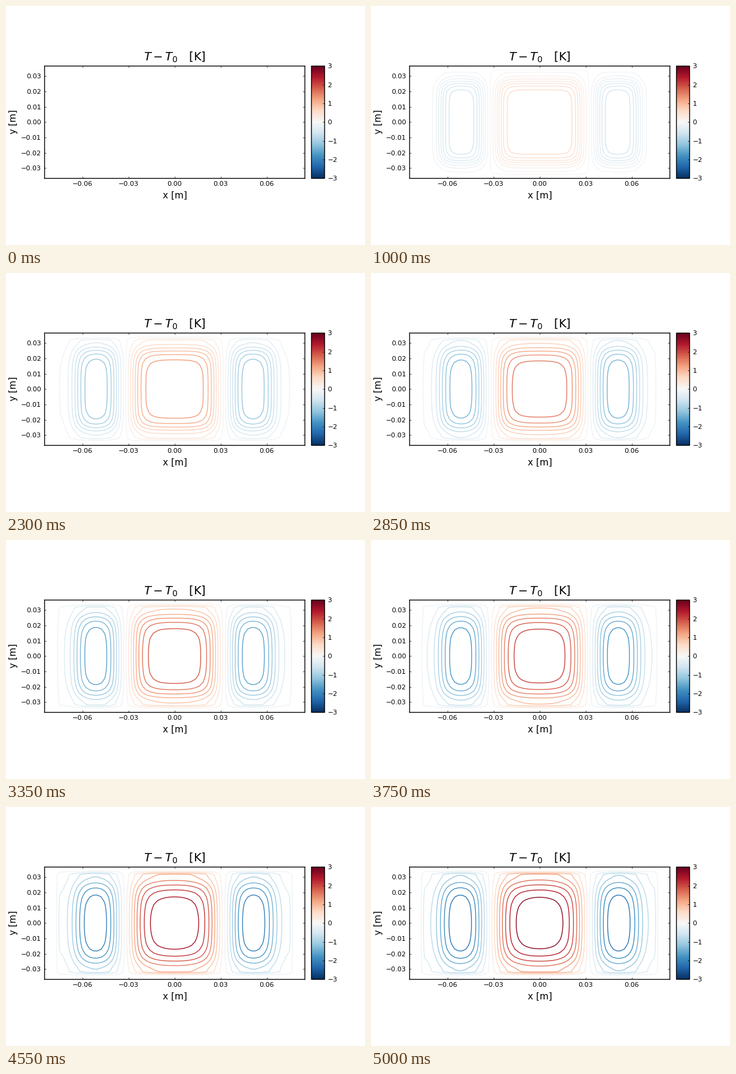
A matplotlib script that plays this animation: 600x400 px, repeating every 5050 ms.

```python
import numpy as np
import matplotlib.pyplot as plt
from matplotlib.animation import FuncAnimation
from matplotlib.cm import ScalarMappable
from matplotlib.colors import Normalize

W, H, DPI = 600, 400, 100
FRAMES, INTERVAL = 101, 50
FIRST_VISIBLE = 4

HALF_X, HALF_Y = 0.08474, 0.03662   # plotted half extents, m
NX, NY = 70, 31                     # plotted nodes
PAD_X, PAD_Y = 4, 2                 # empty nodes around the plate
DIFFUSIVITY = 8.95e-7               # m^2 per frame
HEATING = 0.0311                    # K per frame
EDGE = 0.0027                       # softness of the heater edges, m
HEATER = 0.0265                     # heater half size, m
COOLER = (0.0378, 0.0641)           # cooler extent in |x|, m
SUBSTEPS = 4

plt.rcParams["font.family"] = "DejaVu Sans"

x = np.linspace(-HALF_X, HALF_X, NX)
y = np.linspace(-HALF_Y, HALF_Y, NY)


def band(v, lo, hi):
    """Soft-edged window that is 1 between lo and hi."""
    return 0.5 * (np.tanh((v - lo) / EDGE) - np.tanh((v - hi) / EDGE))


def simulate():
    """Heat the insulated plate step by step; zero outside it."""
    px, py = x[PAD_X:-PAD_X], y[PAD_Y:-PAD_Y]
    along = band(px, -HEATER, HEATER) - band(np.abs(px), *COOLER)
    source = HEATING * np.outer(band(py, -HEATER, HEATER), along)
    cx = DIFFUSIVITY / (x[1] - x[0]) ** 2
    cy = DIFFUSIVITY / (y[1] - y[0]) ** 2
    u = np.zeros_like(source)
    fields = []
    for _ in range(FRAMES):
        fields.append(np.pad(u, ((PAD_Y, PAD_Y), (PAD_X, PAD_X))))
        for _ in range(SUBSTEPS):
            p = np.pad(u, 1, mode="edge")
            flow = (cx * (p[1:-1, 2:] + p[1:-1, :-2] - 2 * u)
                    + cy * (p[2:, 1:-1] + p[:-2, 1:-1] - 2 * u))
            u = u + (flow + source) / SUBSTEPS
    return fields


def pixel_axes(left, top, right, bottom):
    return fig.add_axes([left / W, 1 - bottom / H,
                         (right - left) / W, (bottom - top) / H])


def label(px, py, text, size, **kw):
    fig.text(px / W, 1 - py / H, text, fontsize=size, ha="center", **kw)


fields = simulate()
fig = plt.figure(figsize=(W / DPI, H / DPI), dpi=DPI, facecolor="white")

ax = pixel_axes(64.2, 100.2, 499.2, 288.2)
ax.set_xlim(-HALF_X, HALF_X)
ax.set_ylim(-HALF_Y, HALF_Y)
ax.set_autoscale_on(False)
x_ticks = [-0.06, -0.03, 0, 0.03, 0.06]
y_ticks = [-0.03, -0.02, -0.01, 0, 0.01, 0.02, 0.03]
ax.set_xticks(x_ticks, [f"{v:.2f}".replace("-", "\u2212") for v in x_ticks])
ax.set_yticks(y_ticks, [f"{v:.2f}".replace("-", "\u2212") for v in y_ticks])
ax.tick_params(direction="in", length=2, width=0.5, pad=3.8,
               labelsize=8, top=True, right=True)
for spine in ax.spines.values():
    spine.set_linewidth(1)

label(282, 92, "$T-T_0$   [K]", 14, va="baseline")
label(282, 322, "x [m]", 11, va="baseline")
label(12, 194, "y [m]", 11, va="center", rotation=90)

norm = Normalize(-3, 3)
cax = pixel_axes(510.2, 100.2, 532.2, 288.2)
bar = fig.colorbar(ScalarMappable(norm, "RdBu_r"), cax=cax,
                   ticks=range(-3, 4))
bar.outline.set_linewidth(1)
cax.tick_params(direction="in", length=2, width=0.5, pad=3.8, labelsize=8)

drawn = []


def update(k):
    while drawn:
        drawn.pop().remove()
    if k < FIRST_VISIBLE:
        return []
    u = fields[k]
    levels = np.linspace(u.min(), u.max(), 17)[1:-1]
    drawn.append(ax.contour(x, y, u, levels=levels, cmap="RdBu_r", norm=norm,
                            linewidths=1, linestyles="solid"))
    return drawn


anim = FuncAnimation(fig, update, frames=FRAMES, interval=INTERVAL,
                     init_func=lambda: update(0), repeat=True,
                     repeat_delay=0, blit=False)
plt.show()
```
